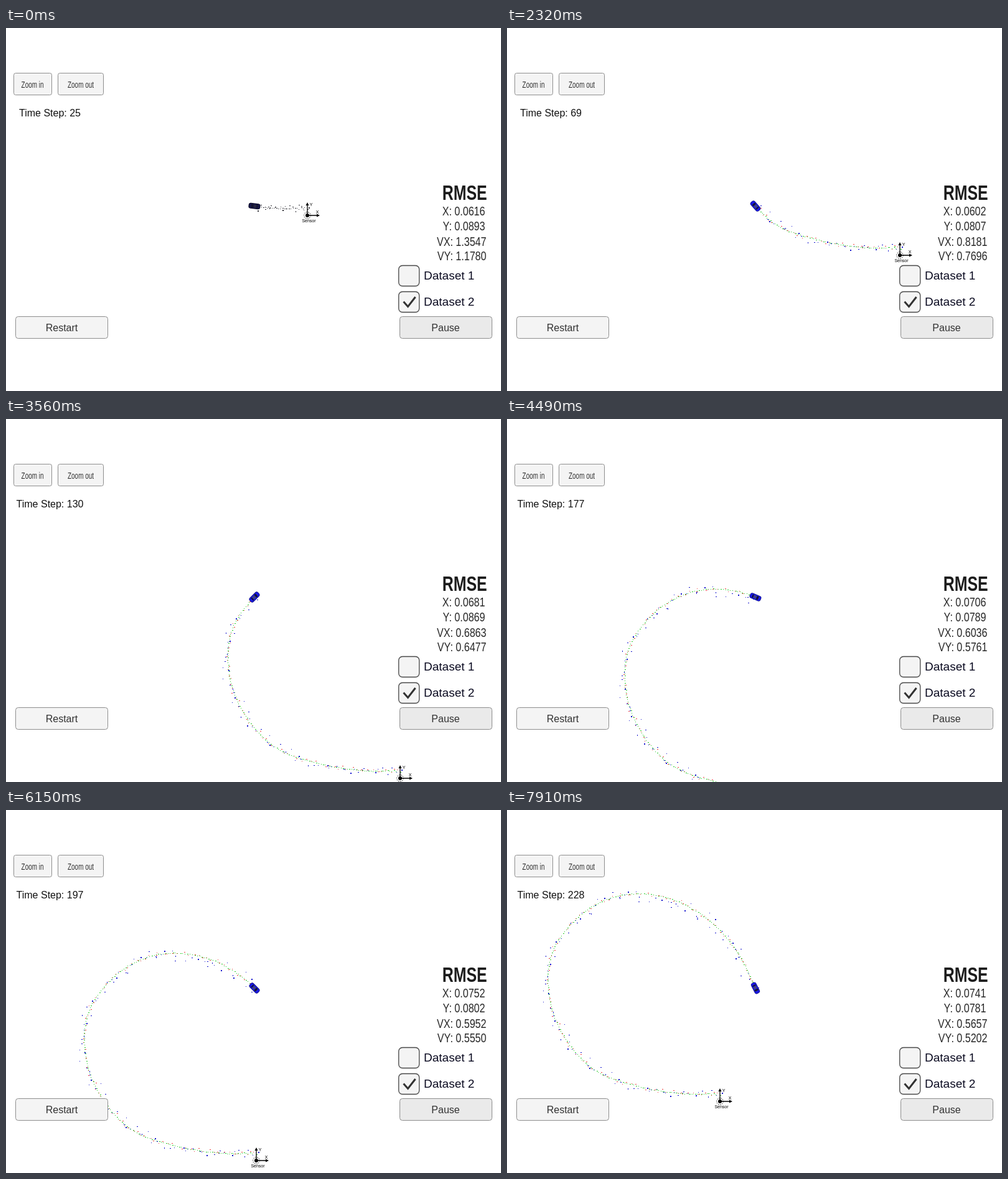
An HTML page with a canvas that plays this animation: 795 by 583 pixels, repeating every 7990 ms.

```html
<!DOCTYPE html>
<html lang="en">
<head>
<meta charset="utf-8">
<title>Tracking simulator</title>
<style>
  html, body { margin: 0; width: 100%; height: 100%; overflow: hidden; background: #fff; }
  canvas, svg { position: absolute; left: 0; top: 0; }
  text { font: 16px "Liberation Sans", Arial, sans-serif; fill: #323232; }
  .mid { text-anchor: middle; }
  .end { text-anchor: end; }
  .zoom { font-size: 14px; }
  .value { font-size: 20.5px; fill: #282828; }
  .title { font-size: 34px; font-weight: bold; fill: #1c1c1c; }
  .set { font-size: 19px; fill: #0a0a20; }
  .button { fill: #f4f4f4; stroke: #8e8e8e; }
  .box { fill: #f4f4f4; stroke: #484848; stroke-width: 1.3; }
</style>
</head>
<body>
<canvas id="world" width="795" height="583"></canvas>
<svg width="795" height="583">
  <g class="button">
    <rect x="12.5" y="72.5" width="61" height="35" rx="3"/>
    <rect x="83.5" y="72.5" width="73" height="35" rx="3"/>
    <rect x="15.5" y="463.5" width="148" height="35" rx="4"/>
    <rect x="632.5" y="463.5" width="148" height="35" rx="4" fill="#eaeaea"/>
  </g>
  <g class="box">
    <rect x="630.7" y="381.5" width="33" height="33" rx="6"/>
    <rect x="630.7" y="423.5" width="33" height="33" rx="6"/>
  </g>
  <path d="M638.5 439.5l7 8L657.5 432" fill="none" stroke="#323232" stroke-width="3"/>
  <text class="mid zoom" transform="translate(42.5 95.5) scale(.71 1)">Zoom in</text>
  <text class="mid zoom" transform="translate(120 95.5) scale(.71 1)">Zoom out</text>
  <text class="mid" x="89.5" y="487">Restart</text>
  <text class="mid" x="706" y="487">Pause</text>
  <text class="set" x="671" y="403.5">Dataset 1</text>
  <text class="set" x="671" y="445.5">Dataset 2</text>
  <text class="mid" id="step" x="70.5" y="142" style="fill:#111"></text>
  <text class="end title" transform="translate(772.5 275.5) scale(.73 1)">RMSE</text>
  <text class="end value" transform="translate(769.5 301) scale(.785 1)"></text>
  <text class="end value" transform="translate(769.5 325) scale(.785 1)"></text>
  <text class="end value" transform="translate(771.5 350) scale(.785 1)"></text>
  <text class="end value" transform="translate(771.5 373) scale(.785 1)"></text>
</svg>
<script>
const LOOP = 7990, TICK = 77.5, CAR = [399, 286];

// Time in ms, step: the simulation alternates between slow and fast running
const PACE = [
  [0, 25], [500, 31], [1600, 40], [1760, 41], [2320, 69], [3560, 130],
  [4490, 177], [4567, 181], [5460, 192], [6030, 196], [7700, 217], [7900, 228]
];

// Car path relative to the sensor, one point every SPAN steps
const SPAN = 19;
const PATH = [
  [0, -12], [-64, -13], [-131, -24.5], [-198.5, -49], [-248, -100], [-274.5, -167.5],
  [-270, -238.5], [-225, -299], [-161, -331], [-88, -328], [-23, -295], [26, -242], [57, -182]
];

// Step, then errors in x, y, vx, vy
const RMSE = [
  [25, .0616, .0893, 1.3547, 1.1780], [40, .0547, .0770, 1.0679, .9432],
  [69, .0602, .0807, .8181, .7696], [130, .0681, .0869, .6863, .6477],
  [177, .0706, .0789, .6036, .5761], [197, .0752, .0802, .5952, .5550],
  [228, .0741, .0781, .5657, .5202]
];

const ctx = document.getElementById('world').getContext('2d');
const stepText = document.getElementById('step');
const values = document.querySelectorAll('.value');

// Linear interpolation of every column after the first
function interpolate(rows, x) {
  const i = Math.max(1, rows.findIndex(r => r[0] >= x));
  const a = rows[i - 1], b = rows[i], u = (x - a[0]) / (b[0] - a[0]);
  return a.slice(1).map((v, c) => v + (b[c + 1] - v) * u);
}

function stepAt(t) {
  const tick = Math.floor((t + 5) / TICK) * TICK - 5;
  const time = Math.min(7900, Math.max(0, tick));
  return Math.floor(interpolate(PACE, time)[0] + 1e-6);
}

// Catmull-Rom curve through the path points
function position(k) {
  const last = PATH.length - 1;
  const i = Math.max(0, Math.min(last - 1, Math.floor(k / SPAN))), u = k / SPAN - i;
  const point = (j, c) =>
    j < 0 ? 2 * PATH[0][c] - PATH[1][c] :
    j > last ? 2 * PATH[last][c] - PATH[last - 1][c] : PATH[j][c];
  return [0, 1].map(c => {
    const [p, a, b, q] = [-1, 0, 1, 2].map(d => point(i + d, c));
    return a + u / 2 * (b - p + u * (2 * p - 5 * a + 4 * b - q + u * (3 * (a - b) + q - p)));
  });
}

// Repeatable bell-shaped noise within -1..1
function noise(k, seed) {
  const r = n => { const s = Math.sin(n * 12.9898 + seed * 78.233) * 43758.5453; return s - Math.floor(s); };
  return (r(k) + r(k + .37) + r(k + .71)) / 1.5 - 1;
}

const mix = (a, b, u) => `rgb(${a.map((v, i) => Math.round(v + (b[i] - v) * u))})`;

function drawTrail(sx, sy, step, tint) {
  const shade = rgb => mix([50, 50, 56], rgb, tint);
  const green = shade([45, 205, 45]), red = shade([240, 70, 70]), blue = shade([25, 25, 205]);
  const dot = (k, p, spread, seed, w, h, color) => {
    ctx.fillStyle = color;
    ctx.fillRect(Math.round(sx + p[0] + noise(k, seed) * spread),
                 Math.round(sy + p[1] + noise(k, seed + 1) * spread), w, h);
  };
  for (let k = 0; k < step; k++) {
    const p = position(k);
    if (k % 2) dot(k, p, 5, 1, k % 4 > 1 ? 2 : 1, 1, red);
    else dot(k, p, 7 + 9 * Math.min(1, k / 60), 3, k % 4 ? 1 : 2, k % 3 ? 1 : 2, blue);
    dot(k, p, .8 + 9 * Math.exp(-k / 2), 5, k % 3 ? 1 : 2, 1, green);
  }
}

function drawSensor(x, y) {
  ctx.save();
  ctx.translate(x, y);
  ctx.fillStyle = ctx.strokeStyle = '#000';
  ctx.lineWidth = 1.3;
  ctx.beginPath();
  ctx.moveTo(0, -17); ctx.lineTo(0, 0); ctx.lineTo(17, 0);
  ctx.stroke();
  ctx.beginPath();
  ctx.moveTo(-2.5, -16); ctx.lineTo(0, -21); ctx.lineTo(2.5, -16);
  ctx.moveTo(15, -2.5); ctx.lineTo(20, 0); ctx.lineTo(15, 2.5);
  ctx.moveTo(3, 0); ctx.arc(0, 0, 3, 0, 7);
  ctx.fill();
  ctx.setLineDash([1.5, 1.7]);
  ctx.lineWidth = 1;
  ctx.beginPath();
  ctx.arc(0, 0, 5.3, 0, 7);
  ctx.stroke();
  ctx.font = '7px "Liberation Sans", Arial, sans-serif';
  ctx.textAlign = 'center';
  ctx.fillText('Y', 6, -15.5);
  ctx.fillText('X', 16, -3);
  ctx.fillText('Sensor', 2.5, 11);
  ctx.restore();
}

function drawCar(angle, tint) {
  const rect = (x, y, w, h, r, color) => {
    ctx.fillStyle = color;
    ctx.beginPath();
    ctx.roundRect(x, y, w, h, r);
    ctx.fill();
  };
  ctx.save();
  ctx.translate(...CAR);
  ctx.rotate(angle);
  rect(-9.5, -4.5, 19, 9, 3.5, mix([8, 8, 30], [14, 14, 140], tint));
  rect(-8.8, -3.8, 17.6, 7.6, 3, mix([22, 22, 72], [26, 26, 225], tint));
  rect(-5.5, -3, 2, 6, 1, '#15152c');
  rect(2, -3, 3, 6, 1, '#15152c');
  rect(-2.5, -2.5, 3.5, 5, 1, mix([40, 40, 60], [72, 72, 110], tint));
  ctx.restore();
}

function frame(now) {
  const step = stepAt(now % LOOP);
  const tint = Math.min(1, (step - 25) / 15);
  const [px, py] = position(step), [qx, qy] = position(step - 1);
  const sx = CAR[0] - px, sy = CAR[1] - py;

  ctx.clearRect(0, 0, 795, 583);
  drawTrail(sx, sy, step, tint);
  drawSensor(Math.round(sx), Math.round(sy));
  drawCar(Math.atan2(py - qy, px - qx), tint);

  stepText.textContent = 'Time Step: ' + step;
  const errors = interpolate(RMSE, step);
  ['X', 'Y', 'VX', 'VY'].forEach((name, i) => {
    values[i].textContent = `${name}: ${errors[i].toFixed(4)}`;
  });
  requestAnimationFrame(frame);
}
requestAnimationFrame(frame);
</script>
</body>
</html>
```
